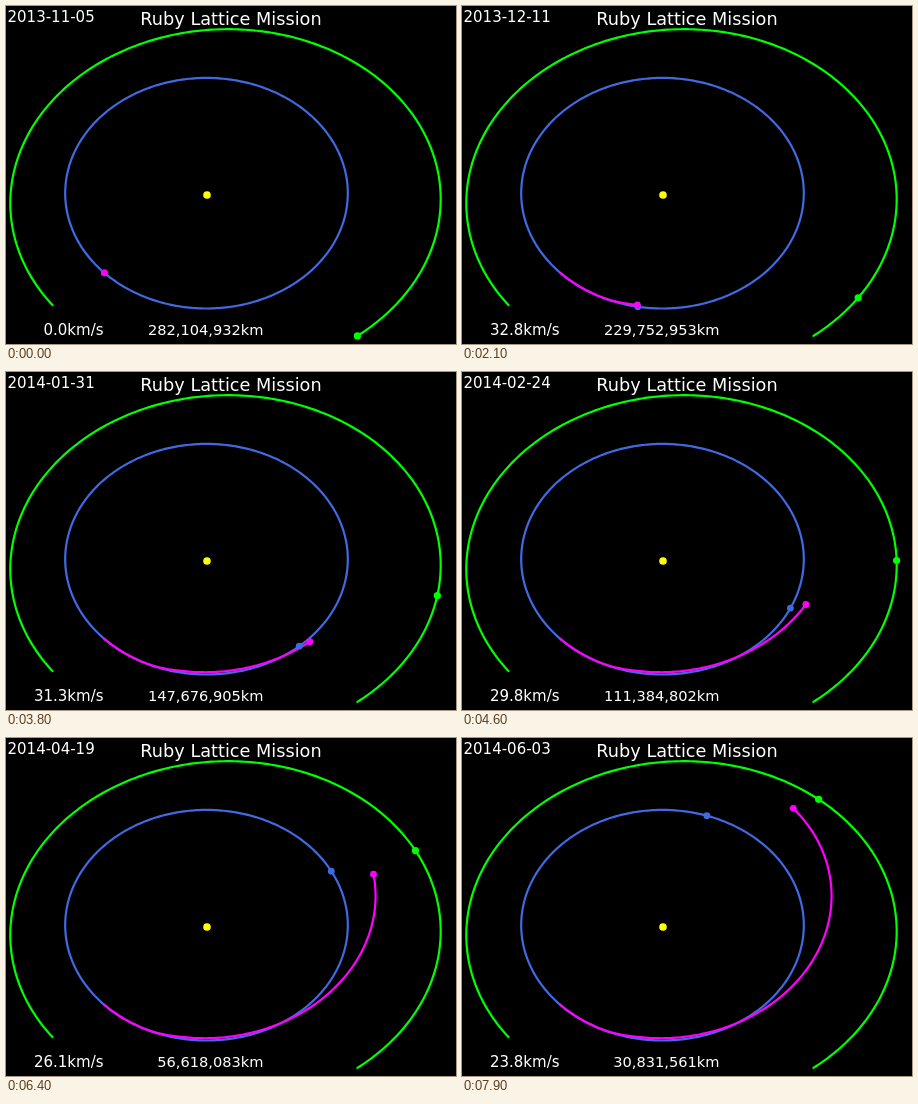
These frames come from a looping animation (450 px wide and 338 px high, 8000 ms). An HTML page with a canvas:

```html
<!DOCTYPE html>
<html lang="en">
<head>
<meta charset="utf-8">
<title>Orbit transfer</title>
<style>
html, body { margin: 0; width: 100%; height: 100%; overflow: hidden; background: #000; }
canvas { display: block; width: 450px; height: 338px; }
</style>
</head>
<body>
<canvas id="stage" width="450" height="338"></canvas>
<script>
const ctx = document.getElementById('stage').getContext('2d');
const LOOP = 8000, HOLD = 1000, STEP = 100, DAYS_PER_STEP = 3;
const RAD = Math.PI / 180;
const SUN = [201, 189], TILT = 0.816;
const BLUE = '#4169e1', GREEN = '#00ff00', MAGENTA = '#ff00ff';
const FONT = '"DejaVu Sans", Verdana, sans-serif';

// Values by day, joined by a smooth curve
const DISTANCE = [[0, 282104932], [15, 263113232], [60, 190827609], [111, 111384802],
  [141, 76170461], [189, 40141228], [210, 30831561]];
const SPEED = [[3, 30.8], [15, 31.1], [27, 32.3], [42, 33], [60, 32.7], [111, 29.8],
  [141, 27.7], [189, 24.7], [210, 23.8]];

function curve(keys, x) {
  const last = keys.length - 1;
  let i = 0;
  while (i < last - 1 && x >= keys[i + 1][0]) i++;
  const slope = k => {
    const a = keys[Math.max(k - 1, 0)], b = keys[Math.min(k + 1, last)];
    return (b[1] - a[1]) / (b[0] - a[0]);
  };
  const [x0, y0] = keys[i], [x1, y1] = keys[i + 1];
  const h = x1 - x0, u = (x - x0) / h, v = 1 - u;
  return v * v * ((1 + 2 * u) * y0 + u * h * slope(i)) +
    u * u * ((3 - 2 * u) * y1 - v * h * slope(i + 1));
}

function innerOrbit(deg) {
  return [200.5 + 141.3 * Math.cos(deg * RAD), 187.2 + 115.3 * Math.sin(deg * RAD)];
}

function outerOrbit(deg) {
  const c = Math.cos(deg * RAD);
  return [219.5 + 215.2 * c, 195.2 + 172 * Math.sin(deg * RAD) - 2 * c];
}

function earth(day) {
  return innerOrbit(136.3 - 0.9856 * day - 1.8 * Math.sin(Math.PI / 2 * day / 130));
}

function mars(day) {
  return outerOrbit(52.2 - 0.4825 * day - 1.4e-7 * day ** 3);
}

// Slightly inclined Kepler ellipse with the sun in one focus
function transfer(day) {
  const e = 0.205, mean = (day - 42.2) * 0.745 * RAD;
  let E = mean;
  for (let i = 0; i < 12; i++) E = mean + e * Math.sin(E);
  const anomaly = 2 * Math.atan(Math.sqrt((1 + e) / (1 - e)) * Math.tan(E / 2));
  const r = 162.7 / (1 + e * Math.cos(anomaly)), angle = 93.8 * RAD - anomaly;
  const x = r * Math.cos(angle), y = TILT * r * Math.sin(angle);
  return [SUN[0] + x, SUN[1] + y + 1 - 0.02 * x];
}

function probe(day) {
  const u = Math.min(1, Math.max(0, (day - 15) / 25)), w = u * u * (3 - 2 * u);
  const a = earth(day), b = transfer(day);
  return [a[0] + (b[0] - a[0]) * w, a[1] + (b[1] - a[1]) * w];
}

function path(point, from, to, color) {
  ctx.beginPath();
  const n = Math.ceil(Math.abs(to - from));
  for (let i = 0; i <= n; i++) ctx.lineTo(...point(from + (to - from) * i / n));
  ctx.strokeStyle = color;
  ctx.stroke();
}

function dot([x, y], r, color) {
  ctx.beginPath();
  ctx.arc(x, y, r, 0, 2 * Math.PI);
  ctx.fillStyle = color;
  ctx.fill();
}

function text(str, x, y, size, align) {
  ctx.font = `${size}px ${FONT}`;
  ctx.textAlign = align;
  ctx.fillStyle = '#fff';
  ctx.fillText(str, x, y);
}

function draw(time) {
  const step = Math.max(0, Math.floor((time - HOLD) / STEP) + 1);
  const day = step * DAYS_PER_STEP;
  ctx.fillStyle = '#000';
  ctx.fillRect(0, 0, 450, 338);
  ctx.lineWidth = 2.2;
  ctx.lineJoin = ctx.lineCap = 'round';

  path(innerOrbit, 0, 360, BLUE);
  path(outerOrbit, 52.2, -216.5, GREEN);
  if (day) path(probe, 0, day, MAGENTA);
  dot(SUN, 3.8, '#ffff00');
  dot(earth(day), 3.4, BLUE);
  dot(mars(day), 3.6, GREEN);
  dot(probe(day), 3.4, MAGENTA);

  const date = new Date(Date.UTC(2013, 10, 5 + day)).toISOString().slice(0, 10);
  const speed = day ? curve(SPEED, day) : 0;
  const distance = Math.round(curve(DISTANCE, day)).toLocaleString('en-US');
  text(date, 1.5, 16, 15, 'left');
  text('Ruby Lattice Mission', 225, 19, 17.7, 'center');
  text(speed.toFixed(1) + 'km/s', 97.5, 329, 15, 'right');
  text(distance + 'km', 257.5, 329, 14.6, 'right');
}

const start = performance.now();
function tick() {
  draw((performance.now() - start) % LOOP);
  requestAnimationFrame(tick);
}
tick();
</script>
</body>
</html>
```
